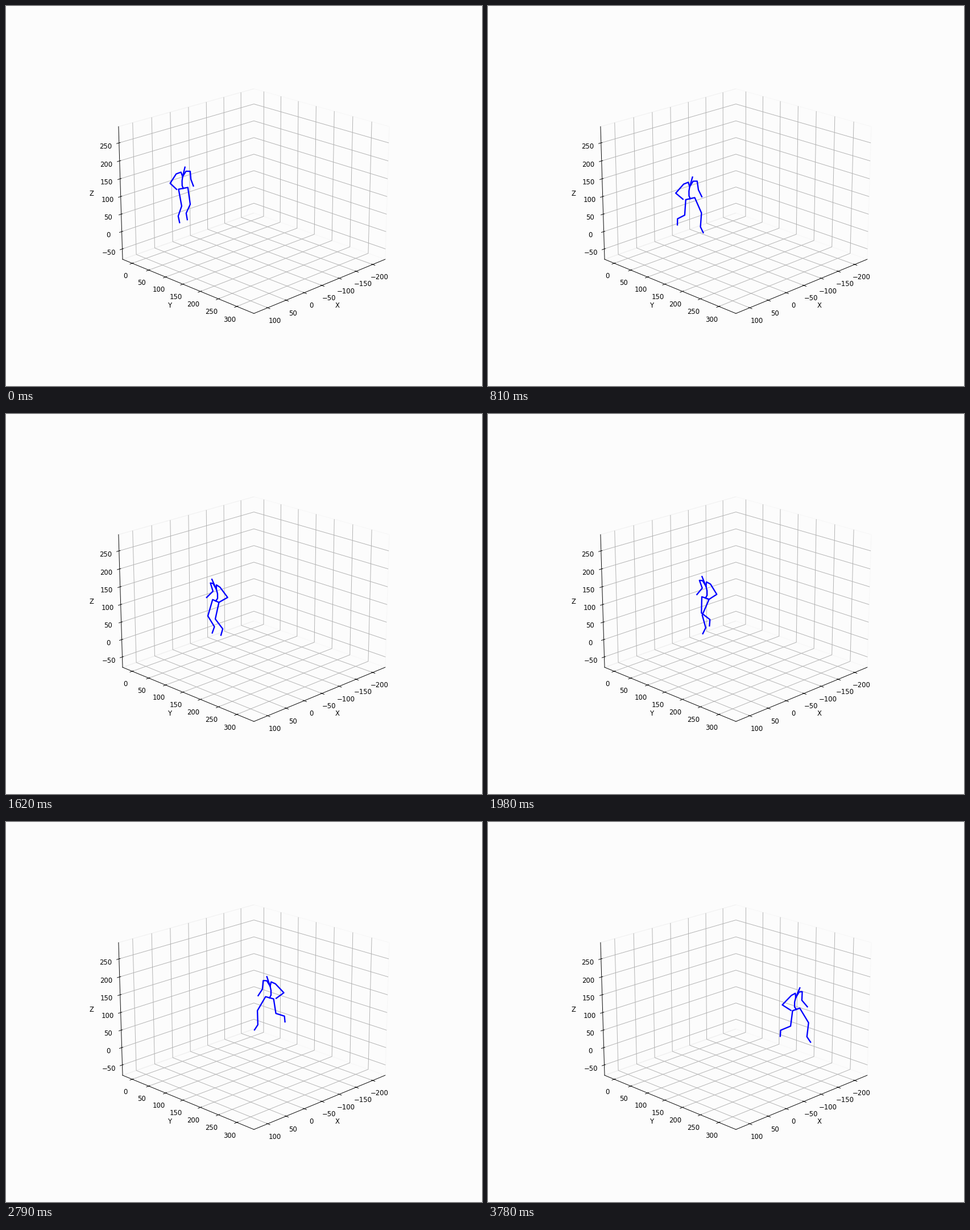
Recreate the animation shown at these times as a matplotlib script. Size 837 by 669 pixels, loop 3.81 s.

```python
import numpy as np
import matplotlib.pyplot as plt
from matplotlib.animation import FuncAnimation
from matplotlib.ticker import MultipleLocator

W, H, DPI = 837, 669, 83.7
FRAMES, INTERVAL = 127, 30
BACK = "#fcfcfc"
CENTER, REACH = np.array([-51, 157.9, 107.4]), 187.5
SCALE = np.array([1.13, 1.13, 1.48])  # body units to axis units

# Key moments: frame, place across the view, place toward the viewer,
# heading in degrees (0 faces the viewer), stride (+1: first leg in front)
KEYS = np.array([
    (0, -142, -33, 30, 0.1),
    (12, -115, -16, 8, 0.4),
    (18, -102, 13, 45, -1),
    (42, -80, 10, -48, 1),
    (66, -61, -23, -45, -0.6),
    (81, -3, -36, -48, 1.1),
    (90, 24, -73, -48, 1.1),
    (105, 66, -36, 20, 1.2),
    (116, 128, -56, 48, -1.1),
    (126, 120, -3, 45, -1),
], float)
TIMES, STATES = KEYS[:, 0], KEYS[:, 1:]
SLOPES = np.gradient(STATES, TIMES, axis=0)


def state_at(n):
    """Smooth Hermite blend between the two nearest key moments."""
    i = min(np.searchsorted(TIMES, n, side="right") - 1, len(TIMES) - 2)
    span = TIMES[i + 1] - TIMES[i]
    u = (n - TIMES[i]) / span
    ease = u * u * (3 - 2 * u)
    return (STATES[i] + ease * (STATES[i + 1] - STATES[i])
            + span * u * (1 - u) * ((1 - u) * SLOPES[i] - u * SLOPES[i + 1]))


# Body axes: sideways, forward, up; the pelvis is the origin.
def bone(length, degrees):
    a = np.radians(degrees)
    return 0, length * np.sin(a), -length * np.cos(a)


def leg(side, swing):
    thigh, shin = 18 + 26 * swing, -33 + 26 * swing
    return np.cumsum([(0, 0, 0), (9.3 * side, 0, 0), bone(31, thigh),
                      bone(28, shin), bone(12, shin + 55)], axis=0)


def arm(side, swing):
    return np.cumsum([(0, -1.5, 22), (5 * side, 3.5, 10.5), (9 * side, -1, -2),
                      (7 * side, -11 + 4 * swing, -20), (-4 * side, 17, -7)], axis=0)


def trunk():
    return np.array([(0, 0, 0), (0, -4, 4), (0, -4, 13), (0, -1.5, 22), (0, 8, 43)])


def place(points, across, toward, heading):
    """Turn body points to the heading and set them into the axes."""
    side, ahead, up = (points * SCALE).T
    c, s = np.cos(np.radians(heading)), np.sin(np.radians(heading))
    p = across + side * c + ahead * s
    q = toward + ahead * c - side * s
    return np.array([(q - p) / np.sqrt(2), (q + p) / np.sqrt(2), up]) + CENTER[:, None]


def body_at(n):
    across, toward, heading, stride = state_at(n)
    parts = [leg(-1, stride), leg(1, -stride), arm(-1, stride), arm(1, -stride), trunk()]
    return [place(part, across, toward, heading) for part in parts]


# The small margin keeps rounding from losing a pixel.
fig = plt.figure(figsize=((W + 0.01) / DPI, (H + 0.01) / DPI), dpi=DPI, facecolor=BACK)
ax = fig.add_subplot(projection="3d", facecolor=BACK)
ax.view_init(elev=20, azim=45)
limbs = [ax.plot(*part, color="blue", lw=2)[0] for part in body_at(0)]

low, high = CENTER - REACH, CENTER + REACH
ax.set(xlim=(low[0], high[0]), ylim=(low[1], high[1]), zlim=(low[2], high[2]),
       xlabel="X", ylabel="Y", zlabel="Z")
for axis in (ax.xaxis, ax.yaxis, ax.zaxis):
    axis.set_major_locator(MultipleLocator(50))
    axis.pane.fill = False


def update(n):
    for limb, part in zip(limbs, body_at(n)):
        limb.set_data_3d(*part)
    return limbs


anim = FuncAnimation(fig, update, frames=FRAMES, interval=INTERVAL, repeat=True)
plt.show()
```
